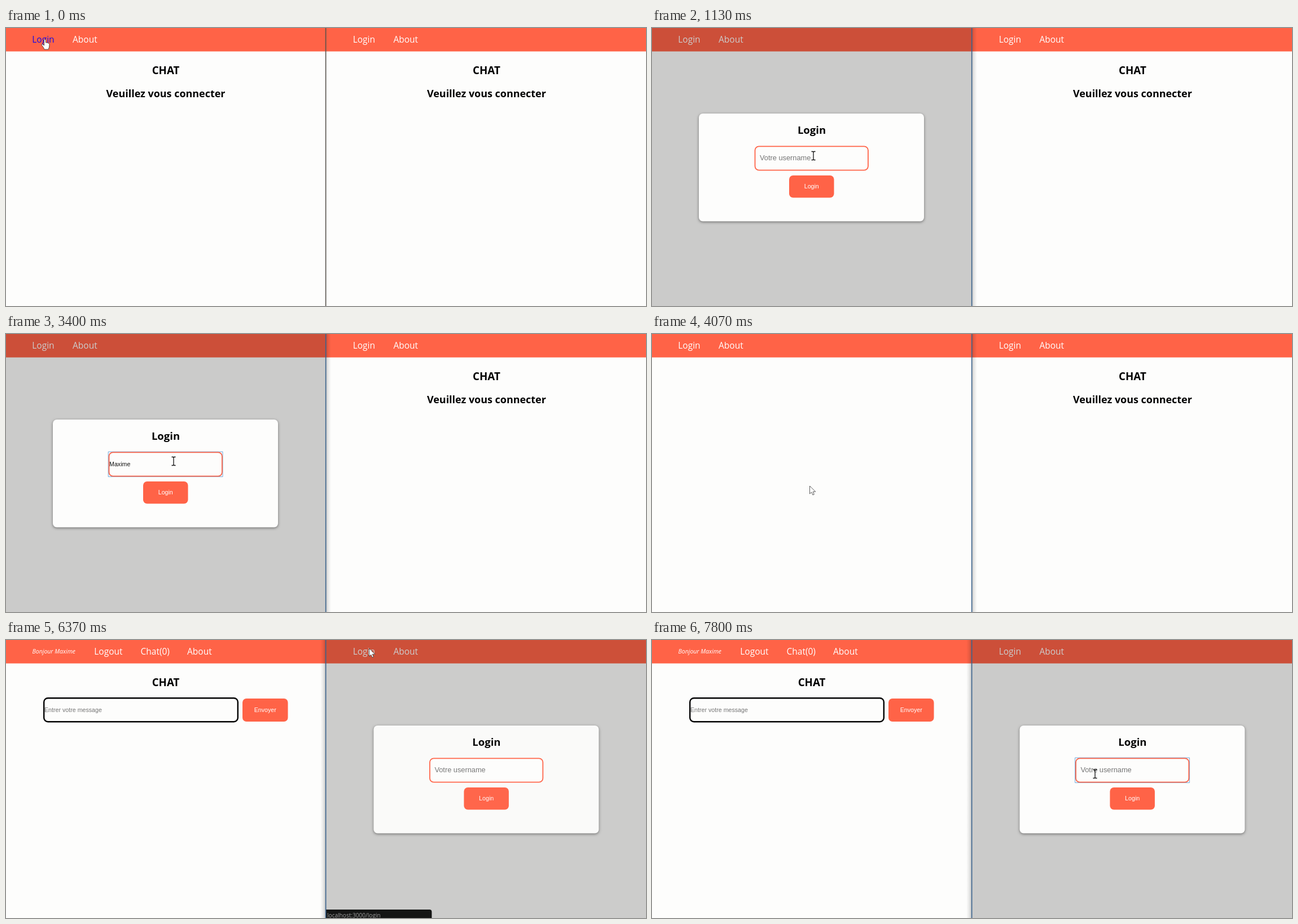
An HTML page with a canvas that plays this animation: 1134x494 px, repeating every 8 s.

```html
<!DOCTYPE html>
<html lang="fr">
<head>
<meta charset="utf-8">
<title>Chat</title>
<style>
html, body { margin: 0; width: 100%; height: 100%; overflow: hidden; background: #fdfdfc; }
canvas { display: block; }
</style>
</head>
<body>
<canvas id="stage" width="1134" height="494"></canvas>
<script>
const ctx = document.getElementById('stage').getContext('2d');
const LOOP = 8000, STEP = 1000 / 15;
const W = 1134, H = 494, HALF = 566, SHIFT = 568.4, NAV_H = 41.6;
const TOMATO = '#ff6347', PAPER = '#fdfdfc';
const UI = '"Open Sans", sans-serif', FORM = '"Liberation Sans", Arial, sans-serif';
const USER = 'Maxime';
const KEY_TIMES = [2060, 2190, 2390, 2520, 2660, 2860];

// Pointer path: time, x, y
const PATH = [
  [0, 69, 20], [800, 69, 20], [1130, 286, 227], [1330, 291, 226], [1800, 297, 226],
  [3400, 297, 226], [3670, 279, 270], [4270, 279, 270], [4730, 264, 20], [5130, 264, 20],
  [5330, 811, 118], [5466, 798, 95], [5590, 798, 95], [5930, 642, 20], [6060, 643, 15],
  [6600, 643, 15], [6800, 700, 154], [7120, 785, 238], [LOOP, 785, 238]
];
const POINTERS = [
  [0, hand], [560, arrow], [1060, beam], [3520, arrow], [4660, hand],
  [5190, arrow], [5860, hand], [6060, arrow], [7060, beam]
];

const clamp = v => Math.max(0, Math.min(1, v));
const ramp = (t, from, to) => clamp((t - from) / (to - from));
const pulse = (t, inA, inB, outA, outB) => ramp(t, inA, inB) * (1 - ramp(t, outA, outB));
const between = (t, from, to) => t >= from && t < to;

function rect(x, y, w, h, color) {
  ctx.fillStyle = color;
  ctx.fillRect(x, y, w, h);
}

function rounded(x, y, w, h, r, fill, stroke, line) {
  ctx.beginPath();
  ctx.roundRect(x, y, w, h, r);
  if (fill) { ctx.fillStyle = fill; ctx.fill(); }
  if (stroke) { ctx.strokeStyle = stroke; ctx.lineWidth = line; ctx.stroke(); }
}

function text(str, x, y, font, color, align = 'left') {
  ctx.font = font;
  ctx.fillStyle = color;
  ctx.textAlign = align;
  ctx.fillText(str, x, y);
}

// Bars and overlays run under the divider, where the pane clips them.
const band = (h, color) => rect(-3, 0, HALF + 6, h, color);

function nav(items, hovered) {
  band(NAV_H, TOMATO);
  for (const [label, x] of items)
    text(label, x, 26, `15.5px ${UI}`, label === hovered ? '#1408e8' : '#fff');
}

const guestNav = hovered => nav([['Login', 46.3], ['About', 118]], hovered);

function memberNav(hovered) {
  nav([['Logout', 156.3], ['Chat(0)', 238.5], ['About', 321]], hovered);
  text('Bonjour ' + USER, 46.5, 24, `italic 10.5px ${UI}`, '#fff');
}

const title = () => text('CHAT', 283, 82, `bold 18.7px ${UI}`, '#000', 'center');

function guestPage() {
  title();
  text('Veuillez vous connecter', 283, 123, `bold 17.95px ${UI}`, '#000', 'center');
}

function chatPage() {
  title();
  rounded(67.2, 103.2, 343.6, 42, 7, PAPER, '#000', 2.4);
  text('Entrer votre message', 68, 127.5, `10.67px ${FORM}`, '#757575');
  button('Envoyer', 419, 104, 80.5, 41);
}

function button(label, x, y, w, h) {
  rounded(x, y, w, h, 7, TOMATO);
  text(label, x + w / 2, y + h / 2 + 3.5, `10.67px ${FORM}`, '#fff', 'center');
}

function loginModal(alpha, { focused, typed = '', caret }) {
  if (alpha <= 0) return;
  ctx.save();
  ctx.globalAlpha = alpha;
  band(H, 'rgba(0,0,0,.2)');
  ctx.shadowColor = 'rgba(0,0,0,.45)';
  ctx.shadowBlur = 5;
  ctx.shadowOffsetY = 1.5;
  rounded(83, 152, 399, 191.5, 7, PAPER);
  ctx.shadowColor = 'transparent';
  text('Login', 283, 188, `bold 18.5px ${UI}`, '#000', 'center');
  if (focused) rounded(181.2, 209.2, 202.8, 44.4, 0, PAPER, '#6fa8dc', 1);
  rounded(182.5, 210.3, 200.4, 42.3, 7, PAPER, TOMATO, 1.8);
  if (typed) text(typed, 183, 235, `10.67px ${FORM}`, '#111');
  else text('Votre username', 191, 234.5, `12.8px ${FORM}`, '#757575');
  if (caret) {
    if (typed) rect(Math.round(183 + ctx.measureText(typed).width), 223, 1, 13, '#000');
    else rect(183, 222, 1, 22, '#000');
  }
  button('Login', 243, 262, 79.5, 39.5);
  ctx.restore();
}

function status(url, width, alpha) {
  if (alpha <= 0) return;
  ctx.save();
  ctx.globalAlpha = alpha;
  rounded(-3, 479, width + 3, 20, [0, 4, 0, 0], '#141514');
  text(url, .6, 493, `10.1px ${UI}`, '#a0a0a0');
  ctx.restore();
}

function pane(left, right, offset, draw) {
  ctx.save();
  ctx.beginPath();
  ctx.rect(left, 0, right - left, H);
  ctx.clip();
  ctx.translate(offset, 0);
  draw();
  ctx.restore();
}

function leftPane(t) {
  const member = t >= 4190;
  if (member) memberNav(between(t, 4720, 5180) && 'Chat(0)');
  else guestNav(t < 560 && 'Login');
  if (t < 560) guestPage();
  if (t >= 4930) chatPage();
  loginModal(pulse(t, 540, 860, 3720, 4020), {
    focused: t >= 1390,
    typed: USER.slice(0, KEY_TIMES.filter(k => t >= k).length),
    caret: between(t, 1390, 1890) || between(t, 2060, 3060)
  });
  status('localhost:3000/login', 188, pulse(t, 100, 260, 950, 1100));
  status('localhost:3000/chat', 186, pulse(t, 4860, 5000, 5590, 5750));
}

function rightPane(t) {
  guestNav(between(t, 5860, 6060) && 'Login');
  if (t < 6060) guestPage();
  loginModal(ramp(t, 6040, 6340), {
    focused: t >= 7290,
    caret: between(t, 7290, 7790)
  });
  status('localhost:3000/login', 186, pulse(t, 6040, 6200, 6920, 7100));
}

// The window in front casts its shadow on the other one.
function divider(t) {
  const idle = t < 560;
  if (!idle) {
    const side = t < 6060 ? 1 : -1;
    const x = side > 0 ? 567 : 566;
    const shade = ctx.createLinearGradient(x, 0, x + 9 * side, 0);
    shade.addColorStop(0, 'rgba(0,0,0,.22)');
    shade.addColorStop(.4, 'rgba(0,0,0,.09)');
    shade.addColorStop(1, 'rgba(0,0,0,0)');
    rect(side > 0 ? x : x - 9, 0, 9, H, shade);
  }
  rect(565.8, 0, 1.6, H, idle ? '#55514c' : '#3b638e');
}

function shape(x, y, points) {
  ctx.beginPath();
  points.forEach(([px, py]) => ctx.lineTo(x + px, y + py));
  ctx.closePath();
  ctx.fillStyle = '#fff';
  ctx.fill();
  ctx.strokeStyle = '#333';
  ctx.lineWidth = .8;
  ctx.lineJoin = 'round';
  ctx.stroke();
}

function arrow(x, y) {
  shape(x + .5, y, [[0, 0], [0, 14], [3.2, 11], [5.4, 16], [7.8, 15], [5.7, 10.2], [10.2, 10.2]]);
}

function hand(x, y) {
  shape(x, y, [[-1.5, 1], [0, 0], [1.3, 1], [1.5, 6], [4, 6], [7, 7.3], [8, 9], [7.5, 14],
    [6, 18], [-1, 18], [-3, 14], [-6, 10], [-5, 8.7], [-3.5, 9.2], [-1.5, 11]]);
}

function beam(x, y) {
  ctx.strokeStyle = '#111';
  ctx.lineWidth = 1.3;
  ctx.beginPath();
  for (const s of [-1, 1]) {
    ctx.moveTo(x - 3.5, y + 7.5 * s);
    ctx.lineTo(x - 1, y + 7.5 * s);
    ctx.lineTo(x, y + 6.5 * s);
    ctx.lineTo(x + 1, y + 7.5 * s);
    ctx.lineTo(x + 3.5, y + 7.5 * s);
  }
  ctx.moveTo(x, y - 7);
  ctx.lineTo(x, y + 7);
  ctx.stroke();
}

function pointer(t) {
  const i = PATH.findIndex(p => p[0] > t);
  const [t0, x0, y0] = PATH[i - 1], [t1, x1, y1] = PATH[i];
  const k = ramp(t, t0, t1), ease = k * k * (3 - 2 * k);
  const draw = POINTERS.filter(p => t >= p[0]).pop()[1];
  draw(x0 + (x1 - x0) * ease, y0 + (y1 - y0) * ease);
}

function frame(now) {
  const t = Math.floor((now % LOOP + 4) / STEP) * STEP % LOOP;
  rect(0, 0, W, H, PAPER);
  pane(0, 567, 0, () => leftPane(t));
  pane(567, W, SHIFT, () => rightPane(t));
  divider(t);
  pointer(t);
}

let start;
function tick(now) {
  start ??= now;
  frame(Math.max(0, now - start));
  requestAnimationFrame(tick);
}
frame(0);
requestAnimationFrame(tick);
</script>
</body>
</html>
```
